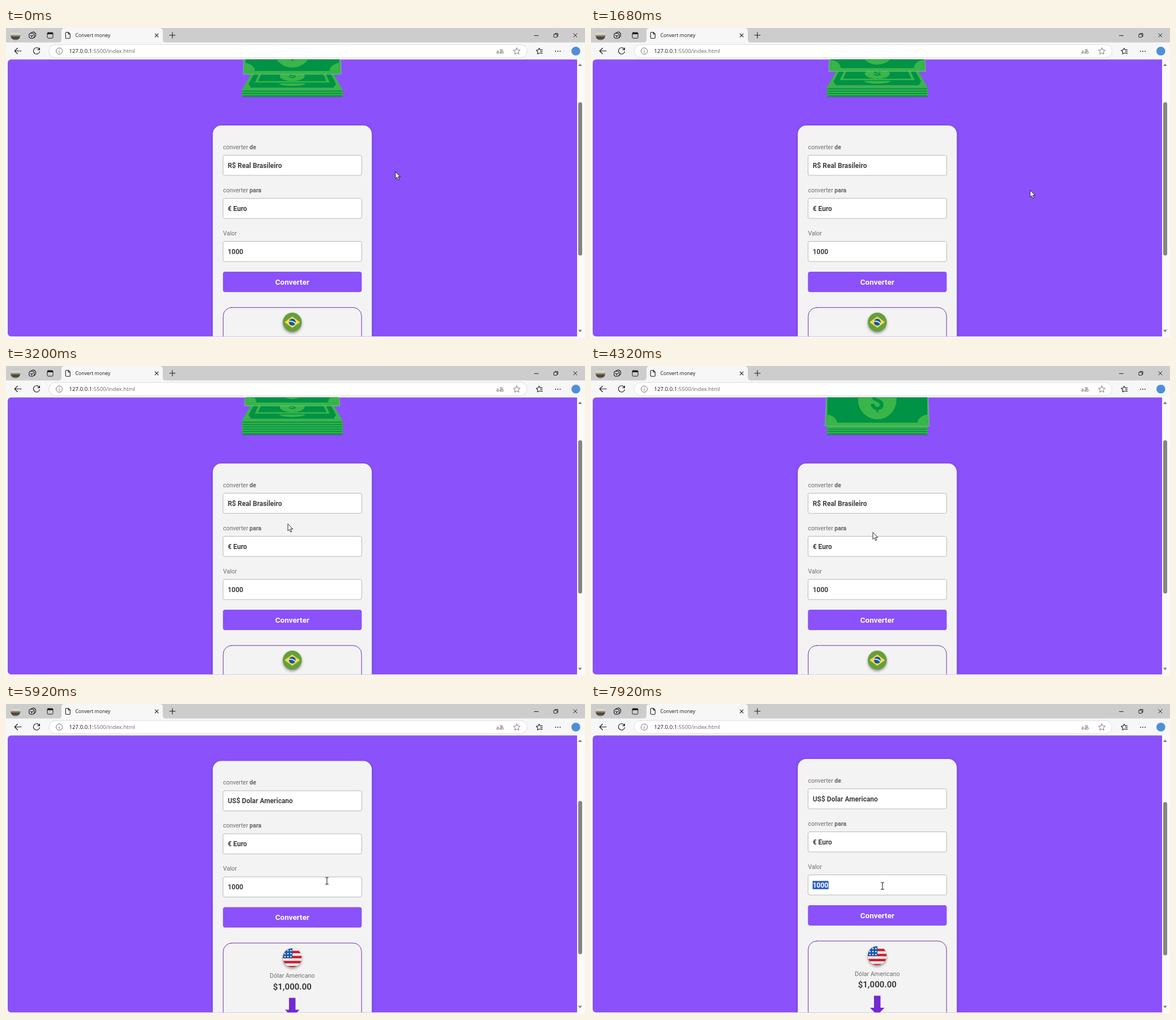
An HTML page with a canvas for the animation above (8 s loop, 1023 px wide and 547 px high).

```html
<!DOCTYPE html>
<html lang="pt-BR">
<head>
<meta charset="utf-8">
<title>Convert money</title>
<style>
html, body { margin: 0; width: 100%; height: 100%; overflow: hidden; background: #f7f7f7; }
canvas { display: block; width: 1023px; height: 547px; }
</style>
</head>
<body>
<canvas id="stage"></canvas>
<script>
const W = 1023, H = 547, LOOP = 8000, STEP = 80;
const PURPLE = '#8b51fb', CARD = '#f3f3f3', LIGHT = '#39b54a', DARK = '#009245', INK = '#1d1d1d';
const UI = '"Open Sans", "Noto Sans", sans-serif', PAGE = 'Roboto, Arial, sans-serif';
const CX = 505.8;
const canvas = document.getElementById('stage');
const c = canvas.getContext('2d');
const dpr = window.devicePixelRatio || 1;
canvas.width = W * dpr;
canvas.height = H * dpr;

// ---------- helpers ----------
function rect(x, y, w, h, fill) {
  c.fillStyle = fill;
  c.fillRect(x, y, w, h);
}

function box(x, y, w, h, r, fill, line) {
  c.beginPath();
  c.roundRect(x, y, w, h, r);
  if (fill) { c.fillStyle = fill; c.fill(); }
  if (line) { c.strokeStyle = line; c.lineWidth = 1; c.stroke(); }
}

function oval(x, y, rx, ry, fill) {
  c.beginPath();
  c.ellipse(x, y, rx, ry, 0, 0, 7);
  c.fillStyle = fill;
  c.fill();
}

function poly(points, fill) {
  c.beginPath();
  points.forEach(p => c.lineTo(p[0], p[1]));
  c.closePath();
  c.fillStyle = fill;
  c.fill();
}

function icon(path, width = 1.1, color = INK) {
  c.strokeStyle = color;
  c.lineWidth = width;
  c.lineCap = c.lineJoin = 'round';
  c.stroke(new Path2D(path));
}

function text(str, x, y, font, fill, align = 'left') {
  c.font = font;
  c.fillStyle = fill;
  c.textAlign = align;
  c.fillText(str, x, y);
  return c.measureText(str).width;
}

function clipped(shape, draw) {
  c.save();
  c.beginPath();
  shape();
  c.clip();
  draw();
  c.restore();
}

function star(x, y, r) {
  let d = '';
  for (let i = 0; i < 10; i++) {
    const a = i * Math.PI / 5 - Math.PI / 2, k = i % 2 ? r * 0.48 : r;
    d += (i ? 'L' : 'M') + (x + k * Math.cos(a)) + ' ' + (y + k * Math.sin(a));
  }
  return d + 'Z';
}

// ---------- motion ----------
const path = [
  [0, 688, 254], [1040, 863, 252], [2400, 672, 328], [3200, 498, 279], [4320, 498, 294],
  [4640, 499, 244], [5040, 500, 264], [5560, 567, 312], [6160, 567, 312], [6720, 515, 321], [8000, 515, 321]
];

function pointer(t) {
  const i = path.findIndex((k, n) => n && t <= k[0]);
  const a = path[i - 1], b = path[i];
  const p = (t - a[0]) / (b[0] - a[0]), e = p * p * (3 - 2 * p);
  return [a[1] + (b[1] - a[1]) * e, a[2] + (b[2] - a[2]) * e];
}

function scrollAt(t) {
  const p = Math.min(1, Math.max(0, (t - 5640) / 440));
  return 75 * (1 - (1 - p) ** 3);
}

// ---------- money ----------
const STARTS = [-497, 1050, 2295, 3759, 5223], BILL_TIME = 142, LAYER = 4.1, FLOOR = 121;

function stackTop(top) {
  const at = (u, v) => [CX + u * (89 - 29 * v), top - 50 * v];
  const quad = (u, a, b) => [at(-u, a), at(u, a), at(u, b), at(-u, b)];
  poly(quad(1, 0, 1), LIGHT);
  poly([at(-0.84, 0.07), at(0.84, 0.07), at(0.93, 0.2), at(0.93, 0.8), at(0.84, 0.93),
    at(-0.84, 0.93), at(-0.93, 0.8), at(-0.93, 0.2)], DARK);
  poly(quad(0.81, 0.25, 0.8), LIGHT);
  poly(quad(0.75, 0.3, 0.75), DARK);
  clipped(() => c.rect(CX - 24, top - 11, 48, 6), () => oval(CX, top - 11, 23, 4.5, LIGHT));
  oval(CX, top - 24, 22, 9, LIGHT);
  c.save();
  c.translate(CX, top - 24);
  c.scale(1.7, 0.7);
  text('$', 0, 5, 'bold 15px ' + PAGE, DARK, 'center');
  c.restore();
}

function fallingBill(bottom) {
  const half = 84 + (bottom - 70) * 0.225, height = 95, top = bottom - height;
  const side = [[CX - half + 4, top], [CX + half - 4, top], [CX + half, bottom], [CX - half, bottom]];
  poly(side, LIGHT);
  clipped(() => c.rect(CX - half + 4, top + 6, half * 2 - 8, height - 12), () => {
    rect(CX - half, top, half * 2, height, DARK);
    for (const s of [-1, 1]) {
      oval(CX + s * (half - 3), bottom - 5, 18, 15, LIGHT);
      oval(CX + s * (half - 3), top + 5, 18, 15, LIGHT);
    }
    oval(CX, bottom - 46, 34, 34, LIGHT);
    text('$', CX, bottom - 29, 'bold 46px ' + PAGE, DARK, 'center');
  });
  c.beginPath();
  side.forEach(p => c.lineTo(p[0], p[1]));
  c.closePath();
  c.strokeStyle = 'rgba(215,225,215,.5)';
  c.lineWidth = 0.7;
  c.stroke();
}

function money(t) {
  const phase = (t - STARTS.filter(s => s <= t).pop()) / BILL_TIME;
  const count = Math.min(10, Math.floor(phase));
  const top = FLOOR - count * LAYER;
  if (count) {
    stackTop(top);
    rect(417, top, 178, FLOOR - top, LIGHT);
    for (let i = 0; i < count; i++) rect(417.8, top + i * LAYER + 1.8, 176.4, 1.9, DARK);
    rect(417, FLOOR, 178, 0.7, 'rgba(40,70,60,.6)');
  }
  if (count === 10) return;
  const bottom = 55 + (top - 55) * (phase - count);
  if (!count) {
    rect(439, bottom, 134, 7.3, LIGHT);
    rect(454, bottom + 1.5, 104, 2, DARK);
  }
  fallingBill(bottom);
}

// ---------- page ----------
function field(y, label, strong, value, selected) {
  const w = text(label, 383.5, y - 10.5, '10.5px ' + PAGE, '#6d6d6d');
  text(strong, 383.5 + w, y - 10.5, 'bold 10.5px ' + PAGE, '#626262');
  box(383.5, y + 0.5, 245, 35.5, 3, '#fff', '#b9b9b9');
  if (selected) rect(391.5, y + 11.2, 28.2, 14.6, '#2c5fc4');
  text(value, 391.7, y + 22.5, 'bold 12px ' + PAGE, selected ? '#fff' : '#3f3f3f');
}

function flag(us) {
  const x = CX, y = 519, r = 16.7;
  c.save();
  c.shadowColor = 'rgba(0,0,0,.4)';
  c.shadowBlur = 4 * dpr;
  c.shadowOffsetY = 2.5 * dpr;
  oval(x, y, r, r, us ? '#f6f6f6' : '#659f3c');
  c.restore();
  clipped(() => c.arc(x, y, r, 0, 7), () => {
    if (us) {
      for (let i = 0; i < 4; i++) rect(x - r, y - 12.2 + i * 8.9, r * 2, 4.5, '#d01f2e');
      rect(x - r, y - r, 17, 17.3, '#1459a8');
      for (let i = 0; i < 9; i++) {
        c.fillStyle = '#fff';
        c.fill(new Path2D(star(x - 13 + i % 3 * 5.3, y - 12.5 + Math.floor(i / 3) * 5.3, 1.9)));
      }
    } else {
      poly([[x - 13.5, y], [x, y - 10], [x + 13.5, y], [x, y + 10]], '#ffda44');
      oval(x, y, 6, 6, '#0f55b0');
      icon(`M${x - 5.3} ${y - 1.4}Q${x + 1} ${y - 2.3} ${x + 5.2} ${y + 2.2}`, 1.7, '#f4f4f4');
    }
  });
}

function page(t) {
  const scroll = scrollAt(t), us = t >= 5040;
  rect(1006, 55, 17, 490, '#fafafa');
  clipped(() => c.roundRect(3, 55.5, 1006, 488.7, [6, 0, 0, 6]), () => {
    rect(0, 50, 1010, 500, PURPLE);
    c.translate(0, -scroll);
    if (scroll < 67) money(t);
    c.save();
    c.shadowColor = 'rgba(0,0,0,.3)';
    c.shadowBlur = 5 * dpr;
    c.shadowOffsetY = 1.5 * dpr;
    box(365.3, 172, 281, 520, 15, CARD);
    c.restore();
    field(224, 'converter ', 'de', us ? 'US$ Dolar Americano' : 'R$ Real Brasileiro');
    field(300, 'converter ', 'para', '€ Euro');
    field(376, 'Valor', '', '1000', t >= 7040);
    box(383.3, 430, 245.2, 36, 4, PURPLE);
    text('Converter', CX, 452.6, 'bold 13.5px ' + PAGE, '#fff', 'center');
    box(383.8, 493.2, 244.4, 180, 15, null, '#6d30a8');
    flag(us);
    if (us) {
      text('Dólar Americano', CX, 554.7, '10.7px ' + PAGE, '#6d6d6d', 'center');
      text('$1,000.00', CX, 575, 'bold 15px ' + PAGE, '#404040', 'center');
      poly([[500, 589.8], [511.5, 589.8], [511.5, 611], [518.5, 611], [CX, 624], [493, 611], [500, 611]], '#7429d3');
    }
  });
  box(1011, 131 + scroll * 0.56, 7, 270.5, 3.5, '#858585');
  poly([[1010.8, 67], [1014.3, 62.7], [1017.8, 67]], '#808080');
  poly([[1010.8, 532.5], [1014.3, 536.8], [1017.8, 532.5]], '#808080');
  return scroll;
}

// ---------- browser frame ----------
function avatar() {
  const g = c.createLinearGradient(0, 4, 0, 22);
  [['0', '#b9c3cb'], ['.4', '#dfdcd2'], ['.55', '#8b7a62'], ['.75', '#3b3934'], ['1', '#8c8a80']]
    .forEach(s => g.addColorStop(+s[0], s[1]));
  oval(16.7, 12.8, 8.8, 8.8, g);
}

function browser() {
  rect(0, 0, W, H, '#f7f7f7');
  rect(0, 0, W, 25.5, '#cdcdcd');
  c.fillStyle = '#f7f7f7';
  c.fill(new Path2D('M92 26Q98 26 98 20V6Q98 0 104 0H271Q277 0 277 6V20Q277 26 283 26Z'));
  avatar();
  // workspaces and tab menu
  icon('M44 8.5L48 7Q49 6.7 50 7.5L52.5 10V14L50 17M40.8 11L43 9.2H47.5L50 11.5V16L47.3 18.3H43.2L40.8 16ZM43.2 13L45.4 14.2L47.7 13M45.4 14.2V16.5');
  box(73, 8, 10, 10, 1.8, null, INK);
  rect(73, 8, 10, 3, INK);
  // active tab
  icon('M105.3 8.7Q105.3 7.5 106.5 7.5H110.2L113.3 10.6V17Q113.3 18.2 112.1 18.2H106.5Q105.3 18.2 105.3 17ZM110 7.7V10.8H113');
  text('Convert money', 122.4, 16.3, '8.7px ' + UI, '#1a1a1a');
  icon('M263.4 10.2L269 15.8M269 10.2L263.4 15.8M289 12.8H299M294 7.8V17.8');
  // window buttons
  icon('M933.5 13.4H940.5M1002.7 9.8L1008.9 16M1008.9 9.8L1002.7 16M970 10V9.6H975V14.8H974.3', 1);
  box(967.8, 11, 5.8, 5.4, 1, null, INK);
  // toolbar
  icon('M27 40.5H15.5M20.3 35.5L15.3 40.5L20.3 45.5M59 37.8A5.6 5.6 0 1 0 59.5 41.5M59.4 35V38.3H56', 1.2);
  box(76, 29.2, 844.5, 23, 11.5, '#fff', '#dedede');
  icon('M88.5 40.7A5.6 5.6 0 1 0 99.7 40.7A5.6 5.6 0 1 0 88.5 40.7M94.1 40.2V43.5M94.1 38V38.1', 0.9, '#606060');
  const host = text('127.0.0.1', 111.6, 44.3, '9.6px ' + UI, '#111');
  text(':5500/index.html', 111.6 + host, 44.3, '9.6px ' + UI, '#666');
  text('aあ', 866, 44.5, '9px "Noto Sans CJK JP", "Noto Sans CJK", sans-serif', '#555');
  icon(star(902.5, 41.2, 6.2), 0.9, '#666');
  icon('M943.2 44L939 45.7L939.5 42L936.8 39.4L940.2 38.8L942 35.5L943.6 38.6H947.7M944.3 41.5H947.7M944.3 44.4H947.7');
  for (const x of [971, 975, 979]) oval(x, 41, 0.9, 0.9, INK);
  oval(1006.8, 40.8, 7.8, 7.8, '#4f8fd8');
}

function cursor(t, scroll) {
  const [x, y] = pointer(t);
  const overInput = x > 383 && x < 629 && y > 376 - scroll && y < 412 - scroll;
  c.save();
  c.translate(x, y);
  if (overInput) {
    const beam = 'M-2.7 -6H-.8L0 -5.4L.8 -6H2.7M-2.7 6H-.8L0 5.4L.8 6H2.7M0 -5.4V5.4';
    icon(beam, 2.4, 'rgba(255,255,255,.8)');
    icon(beam, 1.1, '#222');
  } else {
    const arrow = new Path2D('M0 0V11.8L2.7 9.3L4.8 14L6.8 13.1L4.7 8.5H8.3Z');
    c.fillStyle = '#fff';
    c.fill(arrow);
    c.strokeStyle = '#151515';
    c.lineWidth = 0.9;
    c.lineJoin = 'miter';
    c.stroke(arrow);
  }
  c.restore();
}

function frame(now) {
  const t = Math.floor((now % LOOP) / STEP) * STEP;
  c.setTransform(dpr, 0, 0, dpr, 0, 0);
  browser();
  cursor(t, page(t));
  requestAnimationFrame(frame);
}

requestAnimationFrame(frame);
</script>
</body>
</html>
```
